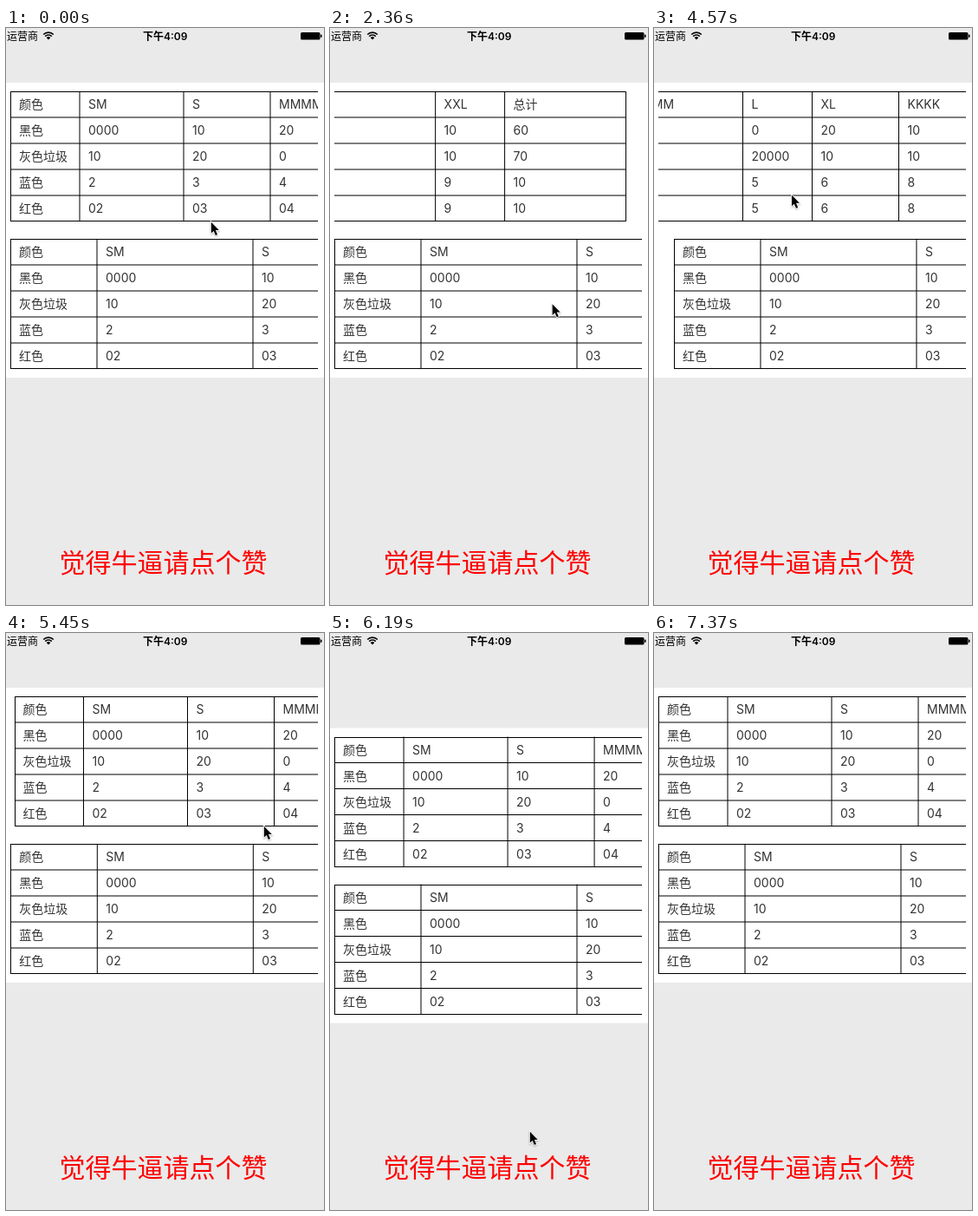
These frames come from a looping animation (367 px wide and 665 px high, 8.27 s). An HTML page with a canvas:

```html
<!DOCTYPE html>
<html lang="zh">
<head>
<meta charset="utf-8">
<style>
html, body { margin: 0; width: 100%; height: 100%; overflow: hidden; background: #eaeaea; }
canvas { display: block; width: 367px; height: 665px; }
</style>
</head>
<body>
<canvas id="stage"></canvas>
<script>
const W = 367, H = 665, LOOP = 8270, LAST_STEP = 49;
const FONT = 'Inter, "Noto Sans CJK SC", "Noto Sans CJK", sans-serif';
const canvas = document.getElementById('stage');
const ctx = canvas.getContext('2d');
const dpr = window.devicePixelRatio || 1;
canvas.width = W * dpr;
canvas.height = H * dpr;

const rows = [
  '颜色 SM S MMMM L XL KKKK XXL 总计',
  '黑色 0000 10 20 0 20 10 10 60',
  '灰色垃圾 10 20 0 20000 10 10 10 70',
  '蓝色 2 3 4 5 6 8 9 10',
  '红色 02 03 04 5 6 8 9 10'
].map(row => row.split(' '));
const upperWidths = [80, 120, 100, 140, 80, 100, 200, 80, 140];
const lowerWidths = [100, 180, 100, 140, 80, 100, 100, 80, 100];

// The picture is held between steps; all motion is a function of the step.
const stepAt = time => Math.max(0, Math.min(LAST_STEP, Math.floor((time - 287) / 147.2) + 1));

const progress = (step, from, to) => Math.max(0, Math.min(1, (step - from) / (to - from)));
function glide(step, from, to) {
  const t = progress(step, from, to);
  return t * t * (3 - 2 * t);
}
const settle = (step, from, to) => 1 - (1 - progress(step, from, to)) ** 3;
function bounce(step, from) {
  const n = Math.max(0, step - from);
  return n * Math.exp(1 - n);
}

const upperScroll = s => 260.5 * glide(s, 0, 8) + 424.5 * glide(s, 8, 14) - 685 * glide(s, 27, 33)
  + 25 * bounce(s, 13) - 22.6 * bounce(s, 32);
const lowerScroll = s => 625 * (glide(s, 16, 21) - glide(s, 25, 29))
  + 10 * bounce(s, 21) - 18 * bounce(s, 29);
const pageOffset = s => 46.5 * glide(s, 36, 41) - 138 * glide(s, 41, 45) + 91.5 * settle(s, 45, 49);

const pointerStops = [
  { at: 0, x: 236, y: 223 }, { at: 8, x: 163, y: 148 }, { at: 16, x: 260, y: 325 },
  { at: 22, x: 112, y: 296 }, { at: 29, x: 150, y: 190 }, { at: 36, x: 297, y: 222 },
  { at: 41, x: 230, y: 574 }, { at: 45, x: 262, y: 64 }
];
function pointerAt(step) {
  const point = { ...pointerStops[0] };
  for (let i = 1; i < pointerStops.length; i++) {
    const a = pointerStops[i - 1], b = pointerStops[i];
    const t = glide(step, a.at, b.at);
    point.x += (b.x - a.x) * t;
    point.y += (b.y - a.y) * t;
  }
  return point;
}

function rect(color, x, y, w, h) {
  ctx.fillStyle = color;
  ctx.fillRect(x, y, w, h);
}

function label(text, x, y, size, color, weight = 400) {
  ctx.font = `${weight} ${size}px ${FONT}`;
  ctx.fillStyle = color;
  ctx.fillText(text, x, y);
}

function table(widths, scroll, top) {
  const total = widths.reduce((a, b) => a + b);
  let x = 5 - scroll;
  const left = Math.round(x);
  ctx.save();
  ctx.beginPath();
  ctx.rect(5, 0, 355, H);
  ctx.clip();
  ctx.strokeStyle = '#000';
  ctx.lineWidth = 1;
  ctx.strokeRect(left + .5, Math.round(top) + .5, total - 1, 149);
  for (let r = 1; r < rows.length; r++) rect('#000', left, top + r * 30 - .5, total, 1);
  widths.forEach((width, column) => {
    if (column) rect('#000', x - .5, top, 1, 150);
    rows.forEach((row, r) => label(row[column], x + 10, top + r * 30 + 20, 14, '#333'));
    x += width;
  });
  ctx.restore();
}

function statusBar() {
  label('运营商', 1, 13.5, 12, '#000');
  label('下午4:09', 158, 13.5, 12, '#000', 600);
  ctx.strokeStyle = '#000';
  ctx.lineWidth = 1.7;
  for (const radius of [8.2, 5.3]) {
    ctx.beginPath();
    ctx.arc(49, 13.3, radius, -Math.PI * .75, -Math.PI * .25);
    ctx.stroke();
  }
  ctx.fillStyle = '#000';
  ctx.beginPath();
  ctx.moveTo(49, 13.5);
  ctx.arc(49, 13.5, 3.2, -Math.PI * .75, -Math.PI * .25);
  ctx.fill();
  ctx.beginPath();
  ctx.roundRect(340, 5, 22.5, 8.5, 1.5);
  ctx.roundRect(363, 7.5, 1.5, 3.5, .7);
  ctx.fill();
}

const arrow = new Path2D('M0 0V14.2L3.2 11.2L5.6 16.8L8 15.8L5.6 10.3H10Z');
function drawPointer({ x, y }) {
  ctx.save();
  ctx.translate(x + .8, y + .8);
  ctx.scale(.9, .9);
  ctx.shadowColor = 'rgba(0,0,0,.3)';
  ctx.shadowBlur = 2 * dpr;
  ctx.shadowOffsetY = dpr;
  ctx.strokeStyle = '#fff';
  ctx.lineWidth = 1.8;
  ctx.stroke(arrow);
  ctx.shadowColor = 'transparent';
  ctx.fillStyle = '#000';
  ctx.fill(arrow);
  ctx.restore();
}

function draw(time) {
  const step = stepAt(time % LOOP);
  const offset = pageOffset(step);
  ctx.setTransform(dpr, 0, 0, dpr, 0, 0);
  rect('#eaeaea', 0, 0, W, H);
  label('觉得牛逼请点个赞', 61.5, 627, 30, '#f00');
  rect('#fff', 0, 63 + offset, W, 340);
  table(upperWidths, upperScroll(step), 73 + offset);
  table(lowerWidths, lowerScroll(step), 243 + offset);
  statusBar();
  if (step < LAST_STEP) drawPointer(pointerAt(step));
}

const start = performance.now();
function tick() {
  draw(performance.now() - start);
  requestAnimationFrame(tick);
}
tick();
</script>
</body>
</html>
```
